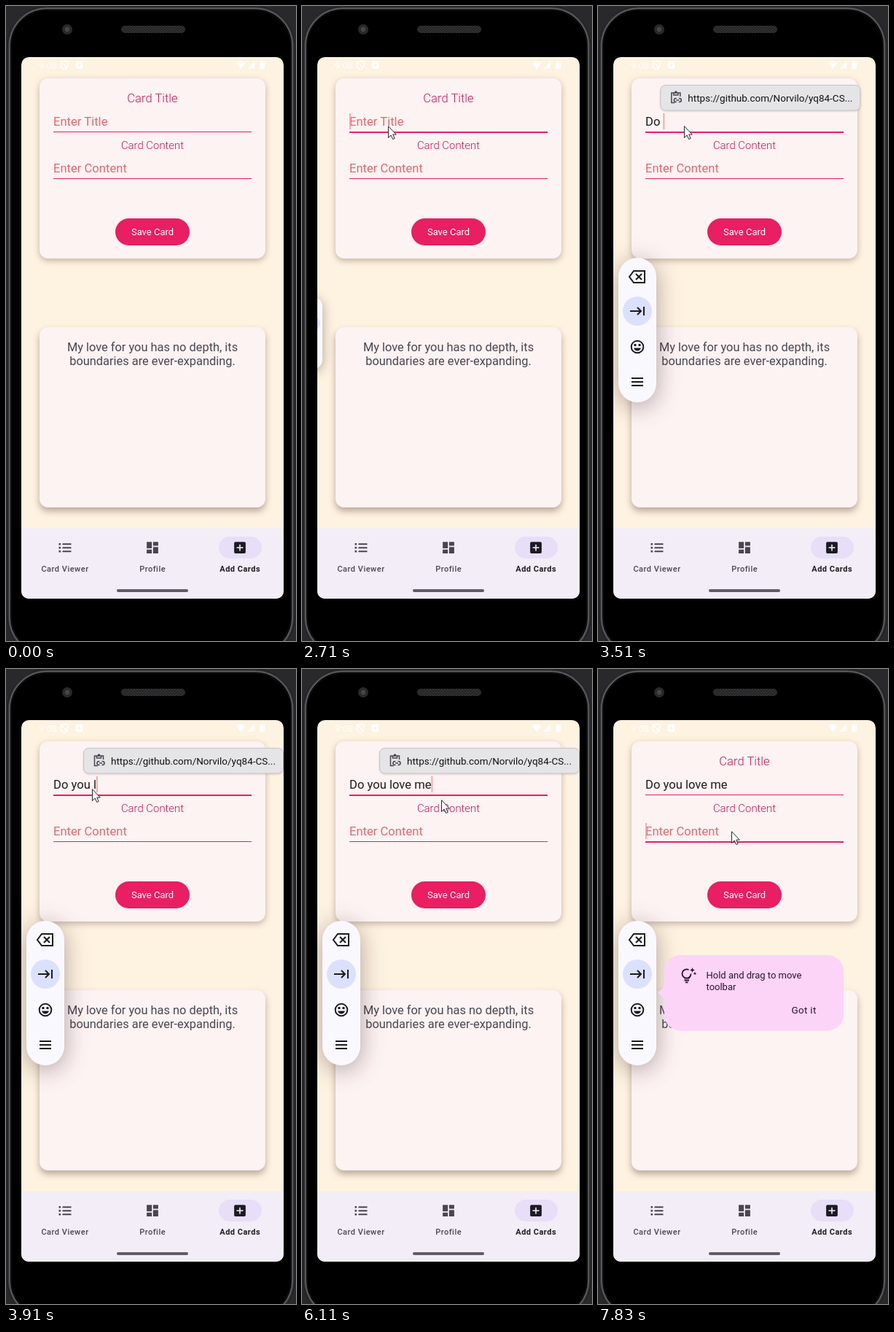
Animation of 398x870 px, one loop 8000 ms. Source, as an HTML page:

```html
<!DOCTYPE html>
<html lang="en">
<head>
<meta charset="utf-8">
<title>Add Cards</title>
<style>
  html, body { margin: 0; width: 100%; height: 100%; overflow: hidden; background: #29292b; }
  svg { display: block; width: 100vw; height: 100vh; }
  text { font-family: Roboto, sans-serif; white-space: pre; }
  .mid { text-anchor: middle; }
  .label { fill: #c2185b; font-weight: 300; }
  .field { font-size: 16.6px; }
  .hint { fill: #de6a74; }
  .nav { font-size: 11px; letter-spacing: .5px; font-weight: 500; fill: #49454f; }
  .card { fill: #fdf3f2; filter: drop-shadow(0 3px 4px rgba(80, 55, 40, .34)); }
  .low { filter: drop-shadow(0 5px 5px rgba(80, 55, 40, .4)); }
  .line { fill: none; stroke: #1d1b20; stroke-width: 2; }
  .accent { fill: #e91e63; }
</style>
</head>
<body>
<svg viewBox="0 0 398 870">
  <defs>
    <clipPath id="screen"><rect x="21" y="70" width="360" height="742" rx="10.500"/></clipPath>
    <pattern id="mesh" width="4" height="4" patternUnits="userSpaceOnUse">
      <rect width="4" height="4" fill="#242425"/>
      <path d="M0 0L4 4M4 0L0 4" stroke="#363637" stroke-width=".8"/>
    </pattern>
  </defs>

  <!-- phone body -->
  <rect width="398" height="870" fill="#29292b"/>
  <rect x="2" y=".5" width="394" height="891" rx="54" fill="#38393b" stroke="#1a1a1b"/>
  <rect x="5" y="3.500" width="388" height="885" rx="51" fill="#0d0d0e" stroke="#626366" stroke-width="1.500"/>
  <rect x="8" y="6.500" width="382" height="879" rx="48" fill="#000"/>
  <circle cx="84" cy="32" r="7" fill="#29292a"/>
  <circle cx="84" cy="32" r="3.200" fill="#444649"/>
  <rect x="158" y="27" width="88" height="10" rx="5" fill="url(#mesh)"/>

  <g clip-path="url(#screen)">
    <rect x="21" y="70" width="360" height="742" fill="#fef2e0"/>

    <!-- status bar -->
    <g fill="#fff">
      <text x="45" y="86" font-size="13">9:08</text>
      <path d="M80 75l5 2v4q0 4-5 6q-5-2-5-6v-4z" fill="none" stroke="#fff" stroke-width="1.4"/>
      <path d="M76 77l8 8" stroke="#fff" stroke-width="1.4"/>
      <rect x="95.500" y="76" width="10" height="10" rx="2.500"/>
      <circle cx="100.500" cy="81" r="2" fill="#fef2e0"/>
      <path d="M315.500 78q6.500-5 13 0L322 86.500zM331 86h10V76zM348 77h2v-1.500h3V77h2v9.500h-7z"/>
    </g>

    <!-- form -->
    <rect class="card" x="46" y="99" width="310" height="247" rx="12"/>
    <text class="mid label" x="201" y="131.500" font-size="16.600">Card Title</text>
    <text class="field" id="title" x="65" y="164"></text>
    <rect class="accent" id="titleLine" x="65" y="172" width="272"/>
    <text class="mid label" x="201" y="196" font-size="14.900">Card Content</text>
    <text class="field hint" x="65" y="228">Enter Content</text>
    <rect class="accent" id="contentLine" x="65" y="236" width="272"/>
    <rect id="caret" width="1.800" height="22" fill="#f5a3a6"/>
    <rect class="accent" x="150" y="291" width="102" height="37" rx="18.500"/>
    <text class="mid" x="201" y="314" font-size="13" fill="#fff">Save Card</text>

    <!-- preview -->
    <rect class="card low" x="46" y="440" width="310" height="247" rx="12"/>
    <g class="mid" font-size="16.400" fill="#49454f">
      <text x="201" y="472.500">My love for you has no depth, its</text>
      <text x="201" y="492">boundaries are ever-expanding.</text>
    </g>

    <!-- navigation -->
    <rect x="21" y="715.500" width="360" height="97" fill="#f3edf7"/>
    <rect x="292" y="727" width="59" height="30" rx="15" fill="#e8def8"/>
    <g fill="#49454f">
      <path d="M77.500 736.300h12v1.900h-12zm0 5h12v1.900h-12zm0 5h12v1.900h-12zM72.500 736h2.600v2.600h-2.600zm0 5h2.600v2.600h-2.600zm0 5h2.600v2.600h-2.600z"/>
      <path transform="translate(190.500 731.500) scale(.875)" d="M3 13h8V3H3zm0 8h8v-6H3zm10 0h8V11h-8zm0-18v6h8V3z"/>
    </g>
    <path transform="translate(310.500 731.500) scale(.875)" fill="#1d1b20" d="M19 3H5q-2 0-2 2v14q0 2 2 2h14q2 0 2-2V5q0-2-2-2zm-2 10h-4v4h-2v-4H7v-2h4V7h2v4h4z"/>
    <g class="mid">
      <text class="nav" x="81" y="775">Card Viewer</text>
      <text class="nav" x="201.200" y="775">Profile</text>
      <text class="nav" x="321.200" y="775" style="font-weight:700;fill:#1d1b20">Add Cards</text>
    </g>
    <rect x="152" y="799" width="98" height="4" rx="2" fill="#605d63"/>

    <!-- clipboard suggestion, drawn from its left edge -->
    <g id="chip">
      <rect x=".5" y="108.500" width="274" height="34.500" rx="7" fill="#e5e4e6" stroke="#c5c6cc" style="filter:drop-shadow(0 1px 1px rgba(0,0,0,.15))"/>
      <g fill="none" stroke="#49454f" stroke-width="1.500">
        <path d="M20 132.500h-4.500V119h12v5M18.500 119v3h6v-3"/>
        <path d="M22.500 126.500h-1a2.500 2.500 0 0 0 0 5h1M25.500 126.500h1a2.500 2.500 0 0 1 0 5h-1M22 129h4"/>
      </g>
      <circle cx="21.500" cy="118" r="1.700" fill="#49454f"/>
      <text x="38" y="131" font-size="13.500" fill="#111114">https://github.com/Norvilo/yq84-CS...</text>
    </g>

    <!-- floating toolbar, centred on its own origin -->
    <g id="toolbar">
      <rect x="-26" y="-99" width="52" height="198" rx="26" fill="#faf8ff" style="filter:drop-shadow(0 6px 16px rgba(60,40,40,.4))"/>
      <circle cy="-26" r="20" fill="#dbe1fc"/>
      <g class="line">
        <path d="M-11-73l6-8H10v16H-5zM-2-77l8 8M6-77l-8 8"/>
        <path d="M-10-26H5M0-31l5 5-5 5M9-32v12"/>
        <circle cy="23" r="8.300"/>
        <path d="M-8 66H8M-8 71H8M-8 76H8"/>
      </g>
      <path d="M-4.500 19h3v3h-3zM1.500 19h3v3h-3zM-5 24.500H5q-1.500 4-5 4t-5-4z" fill="#1d1b20"/>
    </g>

    <!-- tooltip -->
    <g id="tip">
      <path d="M113 392H315a22 22 0 0 1 22 22V473.500a22 22 0 0 1-22 22H113a22 22 0 0 1-22-22V452L82.500 443.500L91 435V414a22 22 0 0 1 22-22z" fill="#fcd4f8"/>
      <path d="M124.500 412.300A6 6 0 1 0 127.500 417.500Q127.500 421 124.800 423.500H118.500M118.500 426.500h6.500M120 429.300h3.500" fill="none" stroke="#2b1230" stroke-width="1.800"/>
      <path d="M129.500 409l1 2.500 2.500 1-2.500 1-1 2.500-1-2.500-2.500-1 2.500-1zM133 415l.7 1.600 1.600.7-1.600.7-.7 1.600-.7-1.600-1.600-.7 1.600-.7z" fill="#2b1230"/>
      <g fill="#2b1230" font-size="13">
        <text x="148.500" y="423.800">Hold and drag to move</text>
        <text x="148.500" y="439.500">toolbar</text>
        <text x="265.500" y="472" font-size="13.500" letter-spacing=".3">Got it</text>
      </g>
    </g>

    <g id="pointer">
      <circle id="click" r="12" fill="#fff04a" opacity=".78"/>
      <path d="M.5.700V16.500L4.200 13L6.700 18.500L9.200 17.400L6.700 12.100H11.300Z" fill="#fff" stroke="#26262b" stroke-width="1"/>
    </g>
  </g>
</svg>

<script>
const LOOP = 8000;
const $ = id => document.getElementById(id);
const [title, titleLine, contentLine, caret, chip, toolbar, tip, pointer, click] =
  ['title', 'titleLine', 'contentLine', 'caret', 'chip', 'toolbar', 'tip', 'pointer', 'click'].map($);

const PHRASE = 'Do you love me';
const KEY_TIMES = [3180, 3310, 3510, 3580, 3640, 3710, 3770, 3910, 4110, 4180, 4380, 4440, 4640, 4770];
const CARET_TOGGLES = [1450, 1980, 2580, 5240, 5770, 6310, 6770, 7240, 7640];
// start, end, number of steps, x, y
const MOVES = [
  [380, 380, 1, 294, 571],
  [450, 450, 1, 274, 441],
  [710, 1310, 9, 110, 140],
  [1650, 1780, 3, 118, 164],
  [5570, 5770, 4, 108, 228],
  [5970, 6110, 3, 191, 179],
  [7300, 7430, 3, 183, 222]
];

const measure = document.createElement('canvas').getContext('2d');
const lerp = (a, b, k) => a + (b - a) * k;
const within = (t, a, b) => t >= a && t < b;
const easeOut = k => 1 - (1 - k) ** 2;
const show = (el, visible) => el.style.display = visible ? '' : 'none';
const countUntil = (times, t) => times.filter(time => time <= t).length;
const typedAt = t => PHRASE.slice(0, countUntil(KEY_TIMES, t));

// Progress in n equal jumps, the first at start and the last at end.
function steps(t, start, end, n) {
  if (t < start) return 0;
  if (t >= end) return 1;
  return (Math.floor((t - start) / (end - start) * (n - 1) + .05) + 1) / n;
}

function pointerAt(t) {
  let x = 294, y = 571;
  for (const [start, end, n, toX, toY] of MOVES) {
    const k = steps(t, start, end, n);
    const eased = k * k * (3 - 2 * k);
    x = lerp(x, toX, eased);
    y = lerp(y, toY, eased);
  }
  return [x, y];
}

function caretX(t) {
  measure.font = '16.6px Roboto, sans-serif';
  return 65 + measure.measureText(typedAt(t)).width;
}

function draw(t) {
  const typed = typedAt(t);
  title.textContent = typed || 'Enter Title';
  title.style.fill = typed ? '#1d1b20' : '#de6a74';

  const inContent = t >= 7640;
  titleLine.setAttribute('height', within(t, 1450, 7640) ? 2 : 1);
  contentLine.setAttribute('height', inContent ? 2 : 1);
  show(caret, countUntil(CARET_TOGGLES, t) % 2);
  caret.setAttribute('x', inContent ? 65 : caretX(t));
  caret.setAttribute('y', inContent ? 211 : 147);

  show(chip, within(t, 2910, 7240));
  chip.setAttribute('opacity', steps(t, 2910, 3040, 3));
  chip.setAttribute('transform', `translate(${Math.min(106, caretX(t - 70))} 0)`);

  const slide = easeOut(Math.min(1, Math.max(0, (t - 2710) / 270)));
  show(toolbar, t >= 2710);
  toolbar.setAttribute('transform',
    `translate(${lerp(15, 54, slide)} ${lerp(448, 444, slide)}) scale(${lerp(.5, 1, slide)})`);

  show(tip, t >= 7700);
  tip.setAttribute('opacity', steps(t, 7700, 7830, 3));

  show(pointer, t >= 380);
  pointer.setAttribute('transform', `translate(${pointerAt(t)})`);
  show(click, within(t, 1310, 1450) || within(t, 7500, 7640));
}

let start;
function tick(now) {
  start ??= now;
  draw((now - start) % LOOP);
  requestAnimationFrame(tick);
}
draw(0);
requestAnimationFrame(tick);
</script>
</body>
</html>
```
